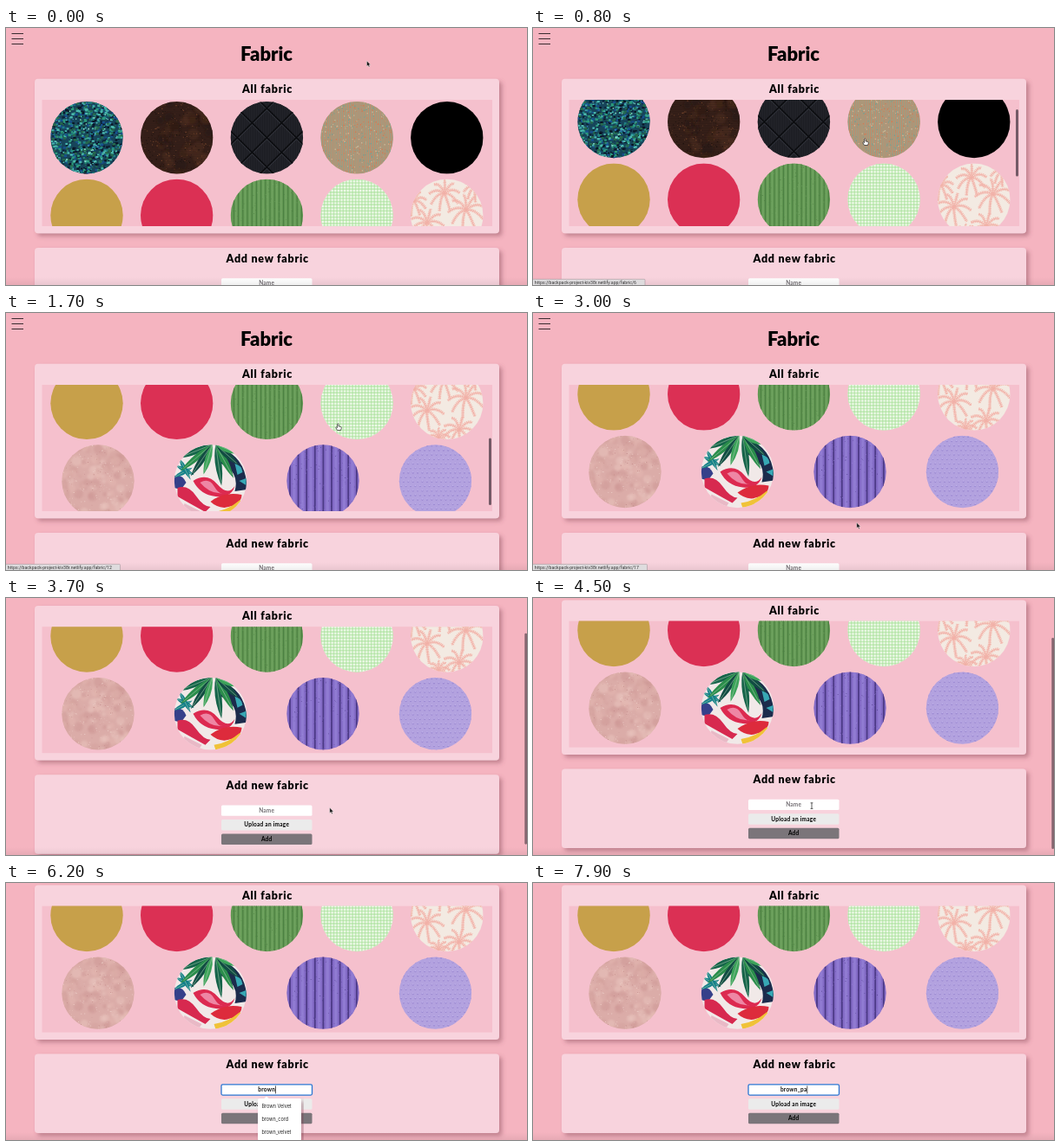
These frames come from a looping animation (600 px wide and 297 px high, 8000 ms). An HTML page:

```html
<!DOCTYPE html>
<html lang="en">
<head>
<meta charset="utf-8">
<title>Fabric</title>
<style>
html, body { margin: 0; width: 100%; height: 100%; overflow: hidden; background: #f5b4c0; }
svg { display: block; width: 600px; height: 297px; }
text { font-family: Lato, "Open Sans", sans-serif; }
.head { font-weight: 900; font-size: 12.5px; letter-spacing: .75px; text-anchor: middle; }
.title { font-weight: 900; font-size: 22px; text-anchor: middle; }
.field { font-weight: 700; font-size: 6.5px; letter-spacing: .25px; text-anchor: middle; }
.list { font-family: Inter, sans-serif; font-size: 5.5px; fill: #222; }
.url { font-family: Roboto, sans-serif; font-size: 5.2px; fill: #333; }
</style>
</head>
<body>
<svg id="stage" viewBox="0 0 600 297"></svg>
<script>
const LOOP = 8000, R = 42, SITE = 'https://backpack-project-kiv38r.netlify.app/fabric/';

let seed = 7;
const rnd = () => (seed = (seed * 16807) % 2147483647) / 2147483647;
const between = (a, b) => a + (b - a) * rnd();
const n1 = v => v.toFixed(1);
const rect = (x, y, w, h, fill, more = '') =>
  `<rect x="${x}" y="${y}" width="${w}" height="${h}" fill="${fill}" ${more}/>`;
const path = (d, fill, more = '') => `<path d="${d}" fill="${fill}" ${more}/>`;
const line = (d, color, width, more = '') =>
  path(d, 'none', `stroke="${color}" stroke-width="${width}" ${more}`);
const base = fill => rect(-R, -R, 2 * R, 2 * R, fill);
const label = (cls, x, y, str, more = '') => `<text class="${cls}" x="${x}" y="${y}" ${more}>${str}</text>`;

// Path of parallel lines across the swatch.
function rows(step, vertical, from = -R) {
  let d = '';
  for (let p = from; p <= R; p += step) d += vertical ? `M${n1(p)} -42V42` : `M-42 ${n1(p)}H42`;
  return d;
}

// Seeded flecks, one path per colour.
function flecks(colors, count, min, max, flat = 1) {
  return colors.map(c => {
    let d = '';
    for (let i = 0; i < count; i++) {
      const s = between(min, max);
      d += `M${n1(between(-R, R))} ${n1(between(-R, R))}h${n1(s)}v${n1(s * flat)}h${n1(-s)}z`;
    }
    return path(d, c);
  }).join('');
}

function clouds(colors, count, min, max, opacity) {
  let out = '';
  for (let i = 0; i < count; i++)
    out += `<circle cx="${n1(between(-R, R))}" cy="${n1(between(-R, R))}" r="${n1(between(min, max))}" fill="${colors[i % colors.length]}" opacity="${opacity}"/>`;
  return `<g filter="url(#soft)">${out}</g>`;
}

function sequins() {
  return base('#17455a') +
    flecks(['#0c2038', '#1f7f86', '#17508f', '#2c9a7c', '#0a1626', '#49b7ad', '#266a4e'], 170, 1.6, 3.4, .8) +
    flecks(['#86d8c4', '#3f86c4'], 45, 1, 1.8);
}

function leather() {
  return base('#38211a') + clouds(['#5c3421', '#261711', '#4c2b1d'], 50, 3, 8, .45) +
    line(rows(2, false), '#1c120e', .6, 'opacity=".5"') + flecks(['#74442a', '#1a100c'], 150, .5, 1.2);
}

function quilt() {
  let d = '';
  for (let k = -102; k <= 102; k += 34) d += `M${k - 50} -50l100 100M${k + 50} -50l-100 100`;
  return base('#1b1c21') + line(rows(2, true), '#292b33', .7) +
    line(d, '#30323a', 1.6, 'transform="translate(0 1.4)"') + line(d, '#0b0c0f', 1.6);
}

function weave() {
  return base('#b39a7b') + line(rows(2.4, true), '#cc8461', 1, 'opacity=".7"') +
    line(rows(2.4, true, -40.8), '#86a58f', .9, 'opacity=".8"') +
    flecks(['#cf7c55', '#76a092', '#cdb594'], 160, .7, 1.5);
}

function cord(dark, mid, light, step, width) {
  return base(mid) + line(rows(step, true, -38 + step * .5), light, step * .35, 'opacity=".6"') +
    line(rows(step, true, -38), dark, width, 'opacity=".85"') +
    flecks([dark, light], 110, .3, .8);
}

function gingham() {
  return base('#f1faec') + line(rows(3.6, true, -41), '#a2df92', 1.7, 'opacity=".52"') +
    line(rows(3.6, false, -41), '#a2df92', 1.7, 'opacity=".52"');
}

// A palm head: feathered fronds fanned around one point.
function palm(x, y, size) {
  let d = '';
  for (let i = 0; i < 9; i++) {
    const a = i * 2 * Math.PI / 9 + x, c = Math.cos(a) * size, s = Math.sin(a) * size;
    d += `M${n1(x)} ${n1(y)}Q${n1(x + c * .5 - s * .1)} ${n1(y + s * .5 - 6)} ${n1(x + c)} ${n1(y + s + 3)}`;
  }
  return line(d, '#f4bcb2', 3.6, 'stroke-dasharray="1.3 .7"') + line(d, '#f1b0a7', .9);
}

function palms() {
  return base('#f3eae2') + [[-3, -25, 18], [-23, 9, 20], [22, -6, 21], [14, 31, 19], [-38, -16, 15], [33, -32, 14], [-10, 40, 14]]
    .map(p => palm(...p)).join('');
}

function fluff() {
  return base('#dbaca8') + clouds(['#ecc8c1', '#cb9593', '#e4b9b2', '#d39f9c'], 110, 2, 6, .45) +
    flecks(['#eccdc6', '#c58e8d'], 110, .4, 1);
}

function leaf(x, y, angle, len, wide, fill) {
  return `<g transform="translate(${x} ${y}) rotate(${angle})">` +
    path(`M0 0Q${len * .45} ${-wide} ${len} 0Q${len * .45} ${wide} 0 0`, fill) +
    line(`M0 0H${len * .9}`, '#a9cfae', .5) + '</g>';
}

function tropical() {
  const left = [[158, 42], [140, 48], [124, 44], [106, 36]];
  const right = [[82, 48], [62, 44], [42, 36], [22, 28]];
  const shades = ['#16644a', '#2a8d4b', '#124c43', '#3da35a'];
  const fan = (x, y, set, wide) => set.map(([a, l], i) => leaf(x, y, a, l, wide, shades[i])).join('');
  return base('#f1e9e8') +
    path('M16 -36Q42 -24 42 10L28 12Q34 -10 12 -20Z', '#1c2b4c') +
    path('M28 -20q8 2 9 10l-6 3zM33 0l8 -3v8z', '#37a7b4') +
    path('M-42 -6Q-32 -8 -28 2L-34 10L-42 8Z', '#35408a') +
    path('M-38 8Q-26 4 -17 17T0 30L-6 36Q-24 26 -38 18Z', '#d7294f') +
    path('M-20 0Q-4 -10 8 4T28 6Q24 20 6 18T-20 0', '#dc2a50') +
    path('M-12 2Q-2 -4 4 6T14 14Q0 16 -12 2', '#ee86a4') +
    path('M0 24Q16 12 36 16Q36 28 16 31Q6 30 0 24', '#dd2b3c') +
    path('M4 36Q20 34 34 22L36 26Q24 40 6 42Z', '#f0c238') +
    path('M-30 26L-10 36L-14 42H-34Z', '#e9b9c6') +
    [[-42, -4, -28, 24], [-40, -18, 28, 24], [-36, -26, 62, 28]].map(([x, y, a, l]) => leaf(x, y, a, l, 5, '#14808a')).join('') +
    fan(2, -42, left, 7) + fan(6, -42, right, 7.5);
}

function bumps() {
  let d = '';
  for (let j = 0; j < 17; j++)
    for (let i = 0; i < 17; i++) d += `M${n1(-42 + i * 5.4 + (j % 2) * 2.7)} ${n1(-41 + j * 5.2)}h.01`;
  const dots = (color, width, dy) => line(d, color, width, `stroke-linecap="round" transform="translate(0 ${dy})"`);
  return base('#b3a2df') + dots('#9a87d0', 2.1, .5) + dots('#c0b2ea', 1.5, -.3);
}

const fabrics = [
  sequins(), leather(), quilt(), weave(), base('#000'),
  base('#c7a04a'), base('#db3054'), cord('#48793f', '#629853', '#78a868', 5.2, 1), gingham(), palms(),
  fluff(), tropical(), cord('#43327c', '#836bc6', '#9a86da', 9.6, 1.8), bumps()
];

function swatch(art, i) {
  const x = i < 10 ? 93 + (i % 5) * 103.7 : 106 + (i - 10) * 129.5;
  const y = i < 5 ? 126.7 : i < 10 ? 216.4 : 306;
  return `<g transform="translate(${x} ${y})"><g clip-path="url(#disc)">${art}</g></g>`;
}

const panel = (y, h) => rect(33, y, 535, h, '#f8d3dd', 'rx="4" filter="url(#drop)"');
const button = (y, fill, str) => rect(248, y, 104.5, 12.5, fill, 'rx="1.5"') + label('field', 300.2, y + 8.4, str);

document.getElementById('stage').innerHTML = `
<defs>
  <clipPath id="disc"><circle r="41.7"/></clipPath>
  <clipPath id="box"><rect x="41.5" y="83" width="518.5" height="146"/></clipPath>
  <filter id="soft"><feGaussianBlur stdDeviation="1.2"/></filter>
  <filter id="drop" x="-5%" y="-10%" width="110%" height="125%">
    <feDropShadow dx="3.3" dy="3.3" stdDeviation="2.8" flood-color="#7a3c50" flood-opacity=".42"/>
  </filter>
  <linearGradient id="shade" x2="0" y2="1"><stop stop-opacity="0"/><stop offset="1" stop-opacity=".06"/></linearGradient>
</defs>
${rect(0, 0, 600, 297, '#f5b4c0')}
<g id="page">
  ${line('M6.5 6.5H20M6.5 12.5H20M6.5 18.5H20', '#3a2b30', 1)}
  ${label('title', 300, 38.2, 'Fabric')}
  ${panel(58.8, 178.5)}
  ${label('head', 301, 75.2, 'All fabric')}
  ${rect(41.5, 83, 518.5, 146, '#f5c0cd')}
  <g clip-path="url(#box)"><g id="grid">${fabrics.map(swatch).join('')}</g></g>
  ${rect(556, 0, 3, 77.5, '#745a66', 'rx="1.5" id="innerBar"')}
  ${panel(254, 91.5)}
  ${label('head', 301.2, 270.6, 'Add new fabric')}
  ${rect(248, 289.2, 104.5, 12.3, '#fff', 'rx="1.5" id="input"')}
  ${label('field', 300.2, 297.4, '', 'id="value"')}
  ${rect(0, 290.8, .7, 9, '#111', 'id="caret"')}
  ${button(305.7, '#ebebeb', 'Upload an image')}
  ${button(322.2, '#7b757a', 'Add')}
</g>
${rect(0, 288, 600, 9, 'url(#shade)')}
<g id="menu">
  <g filter="url(#drop)">${path('M297 249.5l3 -3 3 3z', '#fff')}<rect id="menuBox" x="290" y="249" width="50" fill="#fff" rx="2"/></g>
  ${[0, 1, 2].map(i => label('list', 294.5, 260 + i * 15, '')).join('')}
</g>
${rect(597.3, 0, 2.7, 244, '#85656f', 'rx="1.3" id="pageBar"')}
<g id="status">
  ${rect(-1, 290.3, 131, 8, '#dedcde', 'rx="1" stroke="#a8969d" stroke-width=".6" id="statusBox"')}
  ${label('url', 1.8, 295.7, '', 'id="url"')}
</g>
<g id="pointer">
  ${path('M0 0V6.2L1.4 5 2.4 7.1 3.4 6.6 2.5 4.6H4.3Z', '#111', 'id="arrow" stroke="#fff" stroke-width=".4"')}
  ${path('M-.9 -3.2Q0 -4.2 .6 -3V-.6L3.2 0Q4 .4 3.7 1.8L3 4H-.9L-2.8 1Q-2.4 0 -.9 1Z', '#fff', 'id="hand" stroke="#222" stroke-width=".7"')}
  ${line('M-1.4 -3.2H1.4M0 -3.2V3.4M-1.4 3.4H1.4', '#333', .8, 'id="beam"')}
</g>`;

const $ = id => document.getElementById(id);
const items = [...document.querySelectorAll('.list')];
const show = (el, on) => el.setAttribute('visibility', on ? 'visible' : 'hidden');
const clamp = v => Math.max(0, Math.min(1, v));
const ease = v => v * v * (3 - 2 * v);
const fade = (t, a, b) => clamp((t - a) / 100) * clamp((b - t) / 200);

// Linear track of [time, value] and held steps of the same form.
function track(keys, t) {
  const i = keys.findIndex(k => k[0] > t);
  if (i < 0) return keys[keys.length - 1][1];
  if (!i) return keys[0][1];
  const [a, b] = [keys[i - 1], keys[i]];
  return a[1] + (b[1] - a[1]) * (t - a[0]) / (b[0] - a[0]);
}
const step = (keys, t) => keys.filter(k => k[0] <= t).pop()[1];

const gridScroll = [[550, 0], [800, 18], [1250, 66], [1700, 112], [1900, 120], [2100, 122.5]];
const mouseX = [[150, 415.5], [650, 382.5], [2200, 382.5], [2900, 372.8], [3900, 372.8], [4300, 321]];
const mouseY = [[150, 38], [650, 131.5], [2200, 131.5], [2900, 242.3], [3900, 242.3], [4300, 240]];
const shape = [[0, 'arrow'], [400, 'hand'], [2250, 'arrow'], [2300, 'hand'], [2790, 'arrow'], [4200, 'beam'], [5100, '']];
const hover = [[0, ''], [400, 6], [1050, 12], [2300, 17], [3300, '']];
const typed = [[0, 0], [5200, 1], [5400, 2], [5600, 3], [5800, 4], [6000, 5], [6500, 6], [7100, 7], [7600, 8]];
const options = ['Brown Velvet', 'brown_cord', 'brown_velvet'];

function draw(t) {
  const inner = track(gridScroll, t), p = ease(clamp((t - 3150) / 700));
  $('page').setAttribute('transform', `translate(0 ${-56.4 * p})`);
  $('grid').setAttribute('transform', `translate(0 ${-inner})`);
  $('innerBar').setAttribute('y', 84.3 + inner * .537);
  $('innerBar').setAttribute('opacity', fade(t, 550, 2700));
  $('pageBar').setAttribute('y', 46 * p);
  $('pageBar').setAttribute('opacity', fade(t, 3150, 4800));

  const kind = step(shape, t);
  $('pointer').setAttribute('transform', `translate(${track(mouseX, t)} ${track(mouseY, t)})`);
  for (const id of ['arrow', 'hand', 'beam']) show($(id), id === kind);

  const id = step(hover, t);
  show($('status'), id);
  $('url').textContent = SITE + id;
  $('statusBox').setAttribute('width', id > 9 ? 132.5 : 130);

  const count = step(typed, t), focus = t >= 4900, value = $('value');
  value.textContent = count ? 'brown_pa'.slice(0, count) : 'Name';
  value.setAttribute('fill', count ? '#111' : '#757075');
  $('input').setAttribute('stroke', focus ? '#2b76d2' : 'none');
  $('input').setAttribute('stroke-width', 1.3);
  show($('caret'), focus);
  $('caret').setAttribute('x', count ? 300.2 + value.getComputedTextLength() / 2 : 300);

  const list = count < 6 ? options : options.slice(1);
  show($('menu'), count > 0 && count < 7);
  $('menuBox').setAttribute('height', list.length * 15 + 4);
  items.forEach((el, i) => el.textContent = list[i] || '');
}

function tick(now) {
  draw(now % LOOP);
  requestAnimationFrame(tick);
}
draw(0);
requestAnimationFrame(tick);
</script>
</body>
</html>
```
